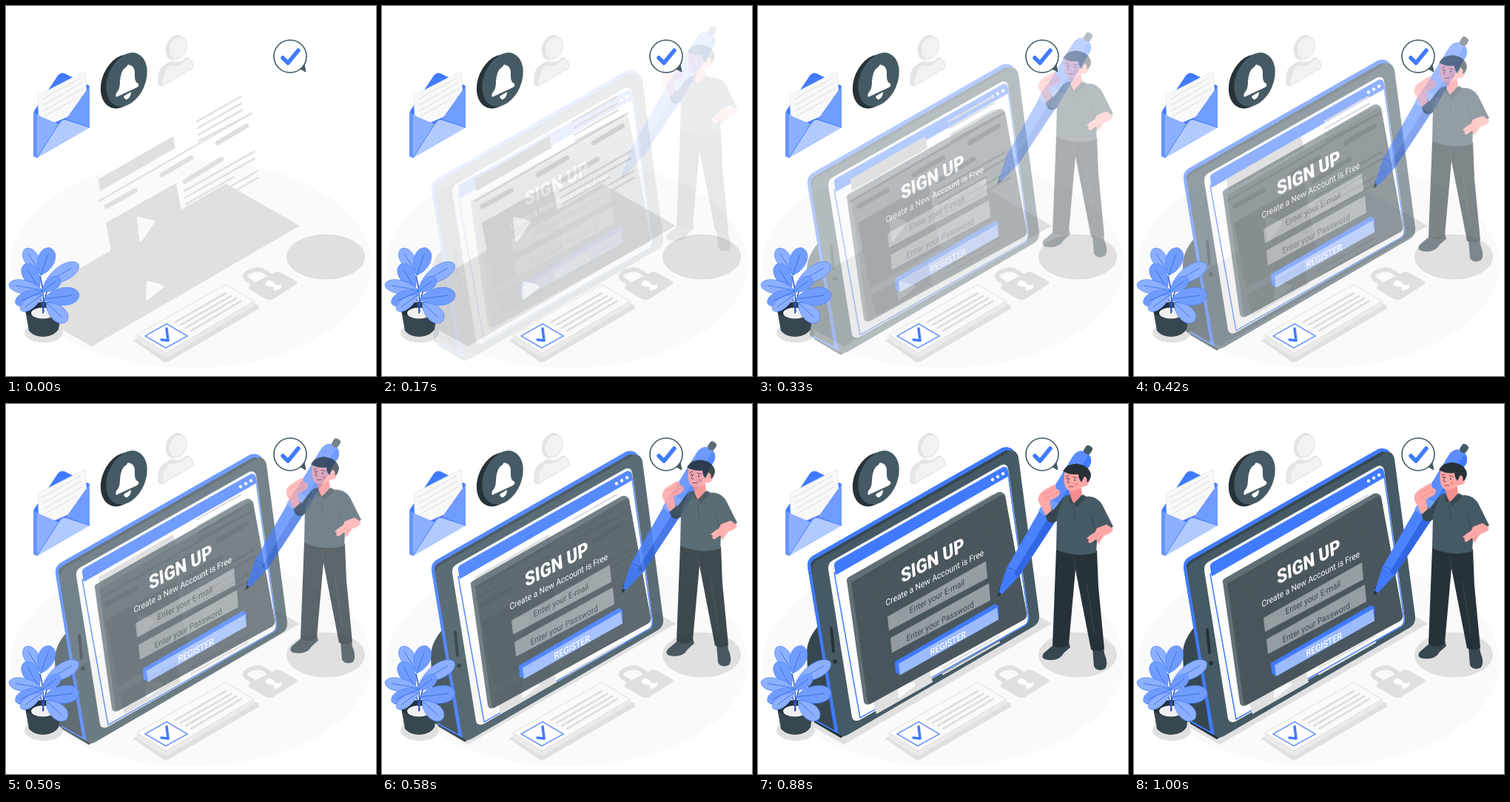
These frames come from a looping animation (500 px wide and 500 px high, 1.04 s). An HTML page:

```html
<!DOCTYPE html>
<html lang="en">
<head>
<meta charset="utf-8">
<title>Sign up</title>
<style>
html, body { margin: 0; width: 100%; height: 100%; overflow: hidden; background: #fff; }
svg { display: block; width: 100vw; height: 100vh; }
text { font-family: Roboto, Inter, sans-serif; }
.round { stroke-linecap: round; stroke-linejoin: round; fill: none; }
</style>
</head>
<body>
<svg viewBox="0 0 500 500">
  <ellipse cx="250" cy="348.500" rx="244" ry="141" fill="#fafafa"/>
  <g fill="#e0e0e0">
    <path d="M297 240 L397 297 L116 460 L68 433 L58 379Z"/>
    <ellipse cx="432" cy="339" rx="53" ry="30.500"/>
    <ellipse cx="51" cy="441" rx="26" ry="14"/>
  </g>

  <!-- tablet -->
  <g class="up">
    <path d="M81 302 Q65 321 66 340 L70 427 L112 453 L124 430Z" fill="#37474f"/>
    <path d="M76 427 L106 443 L118 449 L112 453 L76 432Z" fill="#263238"/>
    <path d="M67 222 Q66 212 74 207 L330 61 Q339 58 345 64 L370 290 L112 449 L104 445Z" fill="#407bff"/>
    <path d="M75 428 L106 445" stroke="#407bff" stroke-width="2"/>
    <path d="M71 224 Q70 216 79 211 L335 66 Q349 61 352 74 L380 287 Q381 297 373 302 L121 449 Q110 454 108 443Z" fill="#455a64"/>
    <path d="M69 216 Q70 210 77 207 L332 63 L340 66 L79 214 Q73 218 74 224Z" fill="#37474f"/>
    <path d="M67 222 Q66 212 74 207 L330 61 Q336 59 339 62 L77 211 Q70 215 71 222 L107 444 L103 442Z" fill="#407bff"/>
    <path d="M99 305 L102 336" stroke="#263238" stroke-width="4" class="round"/>
    <circle cx="104" cy="350" r="3" fill="#263238"/>
    <path d="M95 225 Q94 217 101 213 L329 84 Q336 82 338 89 L366 290 Q366 298 361 301 L137 429 Q129 432 127 425Z" fill="#fafafa"/>
    <path d="M103 230 L338 97 L365 290 Q366 298 360 301 L138 426Z" fill="#fff" stroke="#407bff" stroke-width="1.500"/>
    <path d="M103 221 Q102 217 106 214 L331 87 Q337 86 338 92 L339 99 L105 233Z" fill="#407bff"/>
    <g fill="#fff"><circle cx="317" cy="104" r="2.200"/><circle cx="324" cy="100" r="2.200"/><circle cx="331" cy="96" r="2.200"/></g>
  </g>

  <!-- page content -->
  <g fill="#e0e0e0">
    <path d="M125 234 L226 176 L229 192 L127 250Z"/>
    <path d="M135 293 L230 239 L246 328 L151 382Z"/>
    <path d="M153 391 L229 348 L236 376 L160 419Z"/>
  </g>
  <path d="M177 286 Q176 284 180 285 L199 290 Q202 291 200 294 L184 317 Q181 320 180 316Z M190 373 Q191 371 194 372 L211 377 Q214 378 212 381 L193 396 Q189 399 189 395Z" fill="#fafafa"/>
  <g class="round" stroke="#e0e0e0">
    <path d="M125 264 L332 145" stroke-width="2.200"/>
    <path d="M136 271 L175 249 M211 228 L250 205 M286 185 L325 162 M242 237 L291 207" stroke-width="6.500"/>
    <path id="pageLines" stroke-width="2.400"/>
  </g>

  <!-- form -->
  <g class="up">
    <g opacity=".94">
      <path d="M120 241 Q119 238 122 236 L324 121 Q330 119 334 125 L363 285 Q364 291 358 294 L152 407 Q145 410 143 404Z" fill="#59686f"/>
      <path d="M126 243 L327 126 Q332 123 334 128 L363 285 Q364 291 358 294 L153 406 Q149 408 148 403Z" fill="#3f4d54"/>
    </g>
    <g fill="#fff" fill-opacity=".42">
      <path d="M175 289 L308 214 L310 237 L177 308Z"/>
      <path d="M179 318 L312 244 L314 267 L181 338Z"/>
    </g>
    <path d="M185 350 L320 272 L325 275 L325 293 L192 368 L186 364Z" fill="#407bff"/>
    <path d="M190 353 L323 277 L325 293 L192 368Z" fill="#9cbbff"/>
    <g id="labels"></g>
  </g>

  <!-- pen -->
  <g class="down">
    <g transform="translate(325 257) rotate(-58.400)">
      <path d="M-3 0 L9 -4 L9 4Z" fill="#263238"/>
      <path d="M4 -2 L35 -9.500 L45 -10 L45 10 L35 9.500 L4 3Z" fill="#407bff"/>
      <path d="M36 -10 L130 -13 L130 13 L36 10Z" fill="#4a82ff"/>
      <path d="M36 2 L130 2 L130 13 L36 10Z" fill="#3167e4"/>
      <path d="M38 -10 Q42 0 38 10" stroke="#2e61d8" class="round"/>
      <path d="M126 -14 Q122 0 126 14 L147 14 Q151 0 147 -14Z" fill="#729dff"/>
      <path d="M148 -13 L215 -13 Q227 -11 227 0 Q227 11 215 13 L148 13Z" fill="#5b8dff"/>
      <path d="M148 4 L225 4 Q222 13 215 13 L148 13Z" fill="#407bff"/>
      <rect x="225" y="-5" width="12" height="10" rx="4" fill="#455a64"/>
    </g>
  </g>

  <!-- character -->
  <g class="down">
    <path d="M400 323 L386 335 Q381 343 392 344 Q407 346 413 335 L422 327 L420 320Z M452 328 L454 353 Q459 361 469 356 Q474 350 468 335 L467 327Z" fill="#37474f"/>
    <path d="M403 194 L458 196 L460 245 L468 329 Q460 335 450 330 L429 222 L420 323 Q410 332 398 324Z" fill="#263238"/>
    <path d="M429 222 L426 205 M444 240 L455 310" stroke="#37474f" class="round"/>
    <path d="M413 124 L399 142 L393 135 L388 146 Q390 162 401 158 L415 148Z" fill="#37474f"/>
    <path d="M379 130 Q377 122 385 116 L398 108 Q404 106 402 112 L407 115 Q410 121 402 125 L394 129 L397 142 L389 149Z" fill="#ffa8a7"/>
    <path d="M385 121 L400 113 M388 126 L404 118" stroke="#eb8585" stroke-width=".8" class="round"/>
    <path d="M414 123 Q424 118 441 122 L456 127 Q461 146 457 199 Q431 207 403 195 L404 149Z" fill="#455a64"/>
    <path d="M418 108 L436 107 L438 120 Q432 128 426 133 L422 122Z" fill="#f48e8d"/>
    <path d="M420 121 L427 133 L440 120 L442 127 L430 138 L427 133 L421 132Z" fill="#37474f"/>
    <path d="M426 137 L429 158" stroke="#37474f" class="round"/>
    <path d="M446 123 Q461 124 467 138 L480 164 Q471 171 459 171 L450 151Z" fill="#455a64"/>
    <path d="M450 150 L457 173 L455 184" stroke="#37474f" class="round"/>
    <path d="M458 166 L471 161 L480 167 Q479 173 468 176 L463 183 L460 188 L457 181 L450 186 Q445 187 447 181 L444 180 Q450 174 455 172Z" fill="#ffa8a7"/>
    <path d="M455 179 L461 173 M459 184 L463 177" stroke="#eb8585" stroke-width=".8" class="round"/>
    <path d="M415 88 Q411 106 418 114 Q427 119 437 110 Q447 111 448 101 Q447 92 439 96 L437 85Z" fill="#ffa8a7"/>
    <path d="M412 89 Q418 78 432 79 Q448 82 450 94 Q449 103 444 104 Q446 98 441 96 L437 104 Q433 99 433 93 Q423 95 412 89Z" fill="#263238"/>
    <path d="M416 96 L420 95 M426 97 L431 98 M421 98 L418 104 L421 105 M420 110 L426 110" stroke="#7b4046" class="round"/>
    <g fill="#263238"><circle cx="418" cy="99" r="1"/><circle cx="428" cy="101" r="1"/></g>
    <circle cx="430" cy="107" r="2.500" fill="#f48e8d"/>
  </g>

  <!-- bubble -->
  <path d="M396 84 L405 89 L403 79Z" fill="#455a64" stroke="#455a64"/>
  <circle cx="384" cy="68" r="22" fill="#fff" stroke="#455a64" stroke-width="1.600"/>
  <path d="M374 70 L381 77 L395 60" stroke="#407bff" stroke-width="5.500" class="round"/>

  <!-- envelope -->
  <path d="M38 142 L70 94 Q74 89 79 91 L113 108 L113 164 L42 205 L37 203Z" fill="#407bff"/>
  <path d="M43 121 L107 88 L110 138 L45 166Z" fill="#f8f8f8" stroke="#e8e8e8" stroke-width=".8"/>
  <path d="M49 126 L101 97 M50 134 L102 104 M50 142 L103 112 M52 149 L96 124" stroke="#ddd" class="round"/>
  <path d="M37 143 L42 147 L72 160 L42 205 L37 203Z" fill="#8cb0ff"/>
  <path d="M37 143 L42 148 L42 205 L37 203Z" fill="#6695ff"/>
  <path d="M113 108 L113 164 L81 153Z" fill="#709cff"/>
  <path d="M42 205 L73 157 Q77 152 82 154 L113 164Z" fill="#b3caff"/>
  <path d="M42 205 L73 157 Q77 152 82 154 L113 164" stroke="#407bff" stroke-width=".9" class="round"/>

  <!-- bell -->
  <ellipse cx="156" cy="102" rx="26" ry="38" transform="rotate(23 156 102)" fill="#263238"/>
  <ellipse cx="163" cy="99.500" rx="25.500" ry="38" transform="rotate(23 163 99.500)" fill="#455a64"/>
  <path d="M149 123 Q147 119 151 115 Q154 111 154 102 Q155 86 163 82 Q164 78 168 80 Q175 82 174 95 Q174 103 179 105 Q180 108 177 110Z M159 122 L169 116 Q169 123 164 126 Q160 127 159 122Z" fill="#fff"/>

  <!-- user -->
  <g stroke="#dcdcdc" stroke-width=".8">
    <path d="M206 106 L206 95 Q207 83 218 78 Q222 75 226 75 Q236 79 243 70 Q251 69 253 83 L211 108Z" fill="#e6e6e6"/>
    <path d="M211 108 L211 99 Q212 87 223 79 Q233 83 244 71 Q252 70 253 83Z" fill="#f2f2f2"/>
    <ellipse cx="229" cy="56" rx="12" ry="17" transform="rotate(22 229 56)" fill="#e6e6e6"/>
    <ellipse cx="232" cy="57" rx="11.500" ry="16" transform="rotate(22 232 57)" fill="#f2f2f2"/>
  </g>

  <!-- lock -->
  <path d="M334 375 L325 369 Q320 364 327 360 Q340 353 350 359 L362 368" stroke="#e0e0e0" stroke-width="6" class="round"/>
  <path d="M330 377 L363 360 Q367 358 371 360 L391 371 Q396 374 391 377 L361 396 Q356 398 351 396 L329 383 Q326 380 330 377Z" fill="#e0e0e0"/>
  <path d="M351 373 Q356 369 362 373 Q364 375 363 377 L373 377 L371 382 L363 385 L361 379 Q354 380 351 377Z" fill="#fff"/>

  <!-- card -->
  <path d="M172 452 L212 480 Q216 482 220 480 L342 409 L342 405 L300 384Z" fill="#e0e0e0"/>
  <path d="M177 444 L294 378 Q297 376 300 378 L335 399 L335 405 L216 476 L177 452Z" fill="#ebebeb"/>
  <path d="M177 444 L294 378 Q297 376 300 378 L335 399 L216 469Z" fill="#fafafa" stroke="#e0e0e0"/>
  <path d="M216 469 L216 476" stroke="#d8d8d8"/>
  <path d="M229 427 L297 388 M236 431 L304 392 M243 435 L311 395 M250 439 L317 399" stroke="#e0e0e0" stroke-width="3" class="round"/>
  <path d="M188 446 L217 429.500 L245 446 L216 462Z" fill="#fff" stroke="#407bff" stroke-width="1.200"/>
  <path d="M210 451 L219 452 L217 436" stroke="#407bff" stroke-width="3.500" class="round"/>

  <!-- plant -->
  <path d="M26 411 L31 439 Q38 447 51 447 Q65 446 71 437 L75 411Z" fill="#37474f"/>
  <ellipse cx="50.500" cy="411" rx="24.500" ry="11" fill="#263238"/>
  <ellipse cx="50" cy="415" rx="16" ry="7.500" fill="#f0f0f0"/>
  <g id="plant"></g>
</svg>
<script>
const LOOP = 1040, DURATION = 1000, TRAVEL = 30;
const $ = selector => document.querySelector(selector);

// Evenly spaced parallel text lines: x, y, width, rows.
const rows = (x, y, width, count, step) => Array.from({ length: count }, (_, i) =>
  `M${x + i} ${y + i * step} l${width} ${-width * 0.565}`).join('');
$('#pageLines').setAttribute('d',
  rows(258, 156, 59, 3, 9) + 'M261 182 L332 145' + rows(241, 250, 94, 2, 9) +
  'M243 268 L308 231 M244 277 L340 223 M245 286 L341 232' + rows(249, 357, 76, 2, 8));

const label = (text, x, y, size, fill, weight = 400) =>
  `<text transform="matrix(.866 -.45 .1 1 ${x} ${y})" font-size="${size}" font-weight="${weight}" fill="${fill}">${text}</text>`;
$('#labels').innerHTML =
  label('SIGN UP', 194, 244, 25.5, '#fff', 900) +
  label('Create a New Account is Free', 173, 275, 11.7, '#fff') +
  label('Enter your E-mail', 205, 285, 11.5, '#37474f') +
  label('Enter your Password', 201, 323, 11.5, '#37474f') +
  label('REGISTER', 233, 342, 12.3, '#fff', 500);

function leaf(tipX, tipY, x, y, width, fill) {
  const dx = x - tipX, dy = y - tipY, length = Math.hypot(dx, dy);
  const nx = -dy / length * width, ny = dx / length * width;
  const side = sign => [0.05, 0.65].map(k =>
    `${tipX + dx * k + sign * nx} ${tipY + dy * k + sign * ny}`);
  const [a, b] = side(1), [c, d] = side(-1);
  return `<path d="M${tipX} ${tipY} C${a} ${b} ${x} ${y} C${d} ${c} ${tipX} ${tipY}Z" fill="${fill}" stroke="#407bff" stroke-width=".6"/>` +
    `<path d="M${tipX + dx * 0.2} ${tipY + dy * 0.2} L${x} ${y}" stroke="#3568d8" stroke-width=".8"/>`;
}
const MID = '#709cff', PALE = '#8cb0ff';
$('#plant').innerHTML =
  '<path d="M50 415 Q52 385 46 365 M51 413 Q46 395 43 377 M51 405 Q54 382 62 374" stroke="#2b55b5" stroke-width="1.5" class="round"/>' +
  leaf(26, 328, 47, 362, 13, PALE) + leaf(60, 327, 47, 364, 15, MID) +
  leaf(98, 349, 52, 375, 14, PALE) + leaf(73, 368, 48, 386, 11, MID) +
  leaf(25, 349, 45, 383, 14, MID) + leaf(4, 376, 49, 384, 12, PALE) +
  leaf(13, 402, 50, 385, 12, MID) + leaf(20, 411, 49, 390, 10, PALE) +
  leaf(99, 390, 50, 396, 16, MID) + leaf(82, 426, 54, 401, 14, PALE) +
  '<path d="M50 415 L51 404" stroke="#2b55b5" stroke-width="1.6"/>';

const bezier = (a, b, s) => 3 * (1 - s) ** 2 * s * a + 3 * (1 - s) * s * s * b + s ** 3;

// cubic-bezier(.36, -.01, .5, 1.38): settles after a small overshoot.
function ease(x) {
  let low = 0, high = 1;
  for (let i = 0; i < 30; i++) {
    const mid = (low + high) / 2;
    if (bezier(0.36, 0.5, mid) < x) low = mid; else high = mid;
  }
  return bezier(-0.01, 1.38, high);
}

const groups = [...document.querySelectorAll('.up, .down')];
function render(time) {
  const progress = ease(Math.min(1, time / DURATION));
  const opacity = Math.max(0, Math.min(1, progress));
  for (const group of groups) {
    const direction = group.classList.contains('up') ? 1 : -1;
    group.setAttribute('transform', `translate(0 ${direction * TRAVEL * (1 - progress)})`);
    group.setAttribute('opacity', opacity);
  }
}

const start = performance.now();
function tick() {
  render((performance.now() - start) % LOOP);
  requestAnimationFrame(tick);
}
tick();
</script>
</body>
</html>
```
